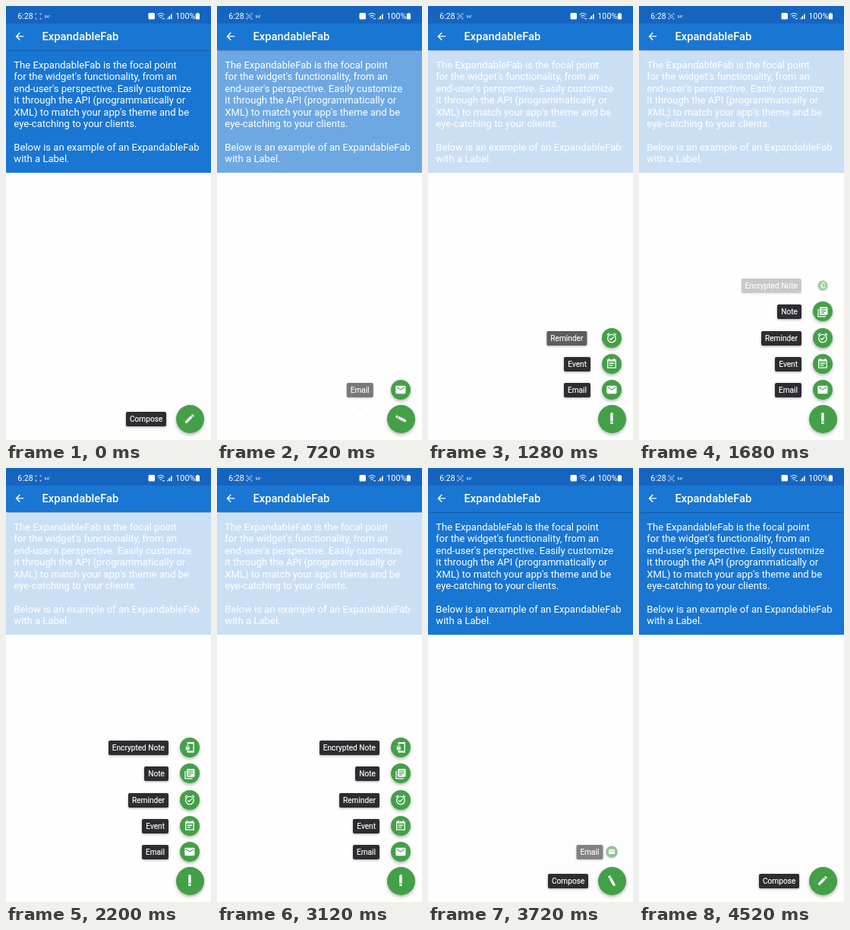
Write an HTML page that moves like this. It is 270 by 570 pixels and loops after 4.56 s.

```html
<!DOCTYPE html>
<html lang="en">
<head>
<meta charset="utf-8">
<title>ExpandableFab</title>
<style>
  html, body { margin: 0; width: 100%; height: 100%; overflow: hidden; }
  body { position: relative; background: #fefdfe; color: #fff; font-family: Roboto, "Noto Sans", sans-serif; }
  body > *, .fab svg { position: absolute; }
  #status { left: 0; top: 0; width: 270px; height: 23px; background: #1565c0; }
  #bar { left: 0; top: 23px; width: 270px; height: 35px; background: #1976d2; box-shadow: 0 .5px 1px rgba(0, 0, 0, .2); }
  #bar svg { position: absolute; left: 10px; top: 9px; }
  #bar span { position: absolute; left: 47.4px; top: 0; font: 500 14.8px/35px Roboto, sans-serif; }
  #about { left: 0; top: 58px; width: 270px; height: 161px; background: #1976d2; }
  #about p { position: absolute; left: 10.3px; top: 12px; margin: 0; font-size: 13.1px; line-height: 15.4px; white-space: pre; }
  #veil { left: 0; top: 58px; width: 270px; height: 512px; background: #fff; }
  .touch { width: 15px; height: 15px; margin: -8px; border: .5px solid rgba(0, 0, 0, .05); border-radius: 50%; }
  .fab { left: 229px; width: 26px; height: 26px; border-radius: 50%; background: #43a047; box-shadow: 0 2px 4px rgba(0, 0, 0, .3); }
  .fab svg { left: 50%; top: 50%; margin: -7.9px; }
  #main { left: 223.7px; top: 523.7px; width: 37px; height: 37px; }
  .label { right: 56px; height: 19px; padding: 0 5px; border-radius: 2px; background: #2d2d31; font-size: 10.15px; line-height: 19px; white-space: nowrap; -webkit-text-stroke: .15px #fff; box-shadow: 0 1px 3px rgba(0, 0, 0, .35); }
  #compose { right: 58.7px; top: 533px; }
</style>
</head>
<body>
<div id="about"><p>The ExpandableFab is the focal point
for the widget's functionality, from an
end-user's perspective. Easily customize
it through the API (programmatically or
XML) to match your app's theme and be
eye-catching to your clients.

Below is an example of an ExpandableFab
with a Label.</p></div>
<div id="veil"></div>
<div id="bar">
  <svg width="15.8" height="15.8" viewBox="0 0 24 24" fill="none" stroke="#fff" stroke-width="2.2"><path d="M20 12H5M12.7 4.7L5.4 12l7.3 7.3"/></svg>
  <span>ExpandableFab</span>
</div>
<svg id="status" width="270" height="23" viewBox="0 0 270 23" fill="#fff" font-family="Roboto, sans-serif">
  <text x="15.3" y="16.6" font-size="10.6">6:28</text>
  <path d="M39 11.5V10h1.5M44.5 10H46v1.5M46 15.5V17h-1.5M40.5 17H39v-1.5" fill="none" stroke="#fff" stroke-width=".8"/>
  <circle id="dot" cx="42.5" cy="13.5" r="1.7" fill="none" stroke="#fff" stroke-width=".8"/>
  <text x="50.5" y="15.5" font-size="5.4">94°</text>
  <rect x="187.5" y="9" width="8.5" height="8.5" rx="1.5"/>
  <path d="M199.5 11.3q4.5-3.4 9 0M201 13.4q3-2.2 6 0M202.7 15.4q1.3-1 2.6 0M206 16.7h3" fill="none" stroke="#fff"/>
  <path d="M211.5 17.3h2v-2zM214.3 17.3h1.8v-5l-1.8 1.8zM217 17.3h1.6V9.8L217 11.4z"/>
  <text x="223.3" y="16.6" font-size="10.8">100%</text>
  <path d="M249.8 10h1.5V9h2.2v1h1.5v7.5h-5.2z"/>
</svg>
<div class="touch" id="tapOpen" style="left:188px;top:537px"></div>
<div class="touch" id="tapClose" style="left:181px;top:368px"></div>
<div class="label" id="compose">Compose</div>
<div class="fab" id="main">
  <svg id="pen" width="15.8" height="15.8" viewBox="0 0 24 24" fill="#fff"><path d="M3 17.25V21h3.75L17.8 9.95l-3.75-3.75zM20.7 7.05q.7-.7 0-1.4l-2.35-2.35q-.7-.7-1.4 0l-1.83 1.83 3.75 3.75z"/></svg>
</div>
<script>
  const LOOP = 4560, OPEN = 480, CLOSE = 3365;
  const IN = { start: 562, step: 264 }, OUT = { start: 3368, step: 80 };
  const SHIFT = 40, TENSION = 3, TURN = -225;
  const line = 'fill="none" stroke="#fff" stroke-width="2"';
  const options = [
    ['Email', 504, '<path fill="#fff" fill-rule="evenodd" d="M4 4h16q2 0 2 2v12q0 2-2 2H4q-2 0-2-2V6q0-2 2-2zM4 6v2l8 5 8-5V6l-8 5z"/>'],
    ['Event', 469.8, `<path ${line} d="M4 4.5h16V20H4zM4 6.3h16M7 1v3M17 1v3M7 11h10M7 15h7"/>`],
    ['Reminder', 435.6, `<circle cx="12" cy="13" r="8" ${line}/><path ${line} d="M16.8 2.6l4.6 3.9M7.2 2.6L2.6 6.5M7.9 12.9l2.7 2.7 5.4-5.5"/>`],
    ['Note', 401.4, `<path ${line} d="M3 6v15h15"/><path fill="#fff" fill-rule="evenodd" d="M8 2h12q2 0 2 2v12q0 2-2 2H8q-2 0-2-2V4q0-2 2-2zM9 5v2h10V5zM9 9v2h10V9zM9 13v2h6v-2z"/>`],
    ['Encrypted Note', 367.2, `<path ${line} d="M8 6V2.5h12v19H8V18M8 4h12M8 20h12"/><rect x="4" y="11" width="8" height="6" rx="1.2" fill="#fff"/><path fill="none" stroke="#fff" stroke-width="1.4" d="M5.9 11V9.5q0-1.8 2.1-1.8t2.1 1.8V11"/>`]
  ];

  const $ = id => document.getElementById(id);
  const clamp = v => Math.min(1, Math.max(0, v));
  const span = (t, start, length) => clamp((t - start) / length);
  const ease = p => (1 - Math.cos(p * Math.PI)) / 2;
  const overshoot = p => (p - 1) ** 2 * ((TENSION + 1) * (p - 1) + TENSION) + 1;
  const within = (t, a, b) => t >= a && t < b;

  function add(cls, html, top) {
    const el = document.createElement('div');
    el.className = cls;
    el.innerHTML = html;
    el.style.top = top + 'px';
    document.body.append(el);
    return el;
  }

  const items = options.map(([name, y, icon], i) => ({
    label: add('label', name, y - 9),
    fab: add('fab', `<svg width="15.8" height="15.8" viewBox="0 0 24 24">${icon}</svg>`, y - 13),
    show: IN.start + i * IN.step,
    hide: OUT.start + (options.length - 1 - i) * OUT.step
  }));

  // Labels enter from the right past their place, and leave to the right.
  function slide(el, enter, leave) {
    const x = SHIFT * (leave > 0 ? leave : 1 - overshoot(enter));
    el.style.opacity = enter * (1 - leave);
    el.style.transform = x ? `translateX(${x}px)` : 'none';
  }

  function draw(t) {
    for (const { label, fab, show, hide } of items) {
      const leave = span(t, hide, OUT.step);
      slide(label, span(t, show, 250), leave);
      const size = span(t, show, 125) * (1 - leave);
      fab.style.opacity = size;
      fab.style.transform = `scale(${size})`;
    }
    if (t < CLOSE) slide($('compose'), 1, span(t, OPEN, 90));
    else slide($('compose'), span(t, CLOSE, 250), 0);

    const turn = span(t, OPEN, 500) - span(t, CLOSE + 20, 500);
    $('pen').style.transform = `rotate(${TURN * turn}deg)`;
    $('veil').style.opacity = .77 * (ease(span(t, OPEN, 500)) - ease(span(t, CLOSE + 30, 250)));
    $('tapOpen').style.opacity = span(t, 400, 80) * (1 - span(t, 700, 80));
    $('tapClose').style.opacity = span(t, 3260, 80) * (1 - span(t, 3500, 80));
    $('dot').style.opacity = within(t, 500, 1700) || within(t, 2400, 4000) || t >= 4500 ? 1 : 0;
  }

  const begin = performance.now();
  function tick() {
    draw((performance.now() - begin) % LOOP);
    requestAnimationFrame(tick);
  }
  tick();
</script>
</body>
</html>
```
